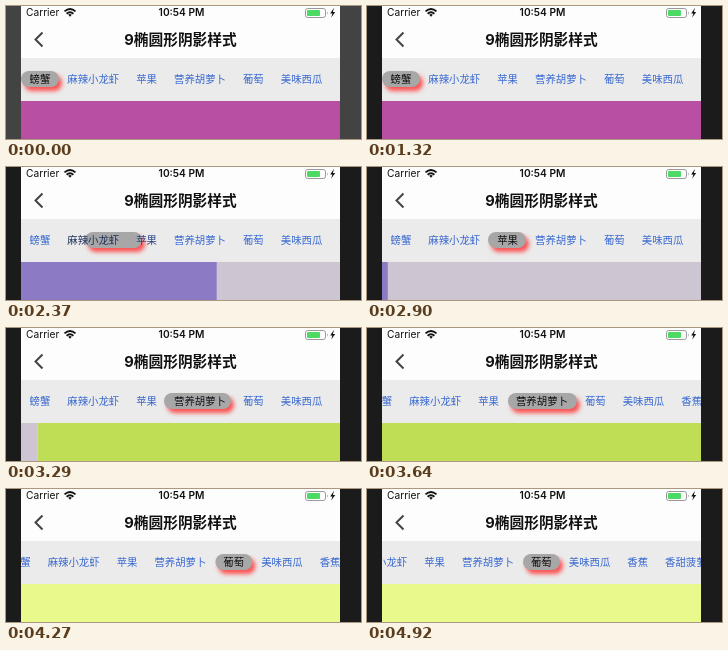
An HTML page for the animation above (5.18 s loop, 355 by 133 pixels).

```html
<!DOCTYPE html>
<html lang="zh-CN">
<head>
<meta charset="utf-8">
<style>
  html, body { margin: 0; width: 355px; height: 133px; overflow: hidden; }
  body { position: relative; font-family: Inter, "Noto Sans CJK SC", "Noto Sans CJK", sans-serif; }
  #phone { position: absolute; left: 15px; width: 319px; height: 133px; overflow: hidden; background: #fdfdfd; }
  #phone > * { position: absolute; white-space: nowrap; }
  .status { top: 0; line-height: 13px; font-size: 10.2px; color: #111; }
  #clock, #title { left: 0; width: 100%; text-align: center; }
  #clock { left: 1px; font-weight: 600; }
  #title { top: 23px; line-height: 22px; font-size: 14.7px; font-weight: 700; color: #111; }
  #icons { left: 0; top: 0; }
  #bar { top: 52px; width: 319px; height: 43px; background: #ebebeb; overflow: hidden; }
  #strip { position: absolute; top: 0; left: 0; height: 43px; display: flex; font-size: 10.4px; line-height: 43px; }
  #strip span { position: relative; padding: 0 8.5px; flex: none; }
  #pill { position: absolute; top: 13px; height: 16px; border-radius: 8px; background: #a7a7a7;
    box-shadow: 3px 4px 4px rgba(255, 45, 45, .8); }
  #pages { top: 95px; left: 0; height: 38px; display: flex; }
  #pages div { width: 319px; height: 38px; flex: none; }
</style>
</head>
<body>
<div id="phone">
  <div class="status" style="left:5px">Carrier</div>
  <div class="status" id="clock">10:54 PM</div>
  <div id="title">9椭圆形阴影样式</div>
  <svg id="icons" width="319" height="52" fill="none">
    <g stroke="#111" stroke-width="1.9">
      <path d="M43.5 5.4Q49 .4 54.5 5.4M45.6 7.7Q49 4.7 52.4 7.7"/>
      <path d="M47.2 8.8Q49 7.4 50.8 8.8L49 10.8Z" fill="#111" stroke="none"/>
    </g>
    <path d="M21.5 26.5L14.5 33.5L21.5 40.5" stroke="#444" stroke-width="2"/>
    <rect x="284.5" y="2.5" width="20" height="9" rx="2.3" stroke="#999"/>
    <rect x="286" y="4" width="13" height="6" rx="1" fill="#4cd964"/>
    <path d="M306 5.2Q307.6 7 306 8.8Z" fill="#999"/>
    <path d="M313 1.8L309.2 7.5H311.4L310.2 11.6L314.2 5.9H311.9Z" fill="#111"/>
  </svg>
  <div id="bar"><div id="strip"><div id="pill"></div></div></div>
  <div id="pages"></div>
</div>
<script>
const LOOP = 5180, PAGE = 319;
const labels = ['螃蟹', '麻辣小龙虾', '苹果', '营养胡萝卜', '葡萄', '美味西瓜', '香蕉', '香甜菠萝'];
const colors = ['#b84fa2', '#8c7ac5', '#cdc5d1', '#bfde56', '#eaf98b'];
const normal = [56, 104, 208], active = [12, 12, 12];

// Each move: start, step duration, step count, from, to, ease-out power
const swipes = [
  [1380, 60, 2, 0, .232, 1],
  [1740, 56, 6, .232, 1, 1.73],
  [2250, 60, 3, 1, 1.386, 1],
  [2610, 58, 7, 1.386, 2, 1.8],
  [3065, 56, 8, 2, 3, 3],
  [3820, 55, 9, 3, 4, 3.1]
];
const scrolls = [
  [3402, 57, 6, 0, 19.6, 2],
  [4275, 59, 7, 19.6, 73, 2]
];

const $ = id => document.getElementById(id);
const mix = (a, b, u) => a + (b - a) * u;

function add(parent, tag) {
  return $(parent).appendChild(document.createElement(tag));
}

const tabs = labels.map(text => {
  const el = add('strip', 'span');
  el.textContent = text;
  return el;
});
colors.forEach(color => add('pages', 'div').style.background = color);

const widths = labels.map(text => text.length * 10.4 + 17);
const lefts = widths.map((_, i) => widths.slice(0, i).reduce((sum, w) => sum + w, 0));

function valueAt(moves, t) {
  let value = 0;
  for (const [start, step, count, from, to, power] of moves) {
    if (t < start) break;
    const u = Math.min(1, (Math.floor((t - start) / step) + 1) / count);
    value = mix(from, to, 1 - (1 - u) ** power);
  }
  return value;
}

function draw(now) {
  const t = now % LOOP;
  const page = valueAt(swipes, t);
  const i = Math.floor(page), u = page - i;

  document.body.style.background = t < 1320 ? '#434343' : '#1b1b1b';
  $('pages').style.transform = `translateX(${-page * PAGE}px)`;
  $('strip').style.transform = `translateX(${-valueAt(scrolls, t)}px)`;
  $('pill').style.left = mix(lefts[i], lefts[i + 1], u) + 'px';
  $('pill').style.width = mix(widths[i], widths[i + 1], u) + 'px';
  tabs.forEach((tab, n) => {
    const near = Math.max(0, 1 - Math.abs(page - n));
    tab.style.color = `rgb(${normal.map((c, k) => mix(c, active[k], near))})`;
  });
}

const begin = performance.now();
function tick() {
  draw(performance.now() - begin);
  requestAnimationFrame(tick);
}
tick();
</script>
</body>
</html>
```
